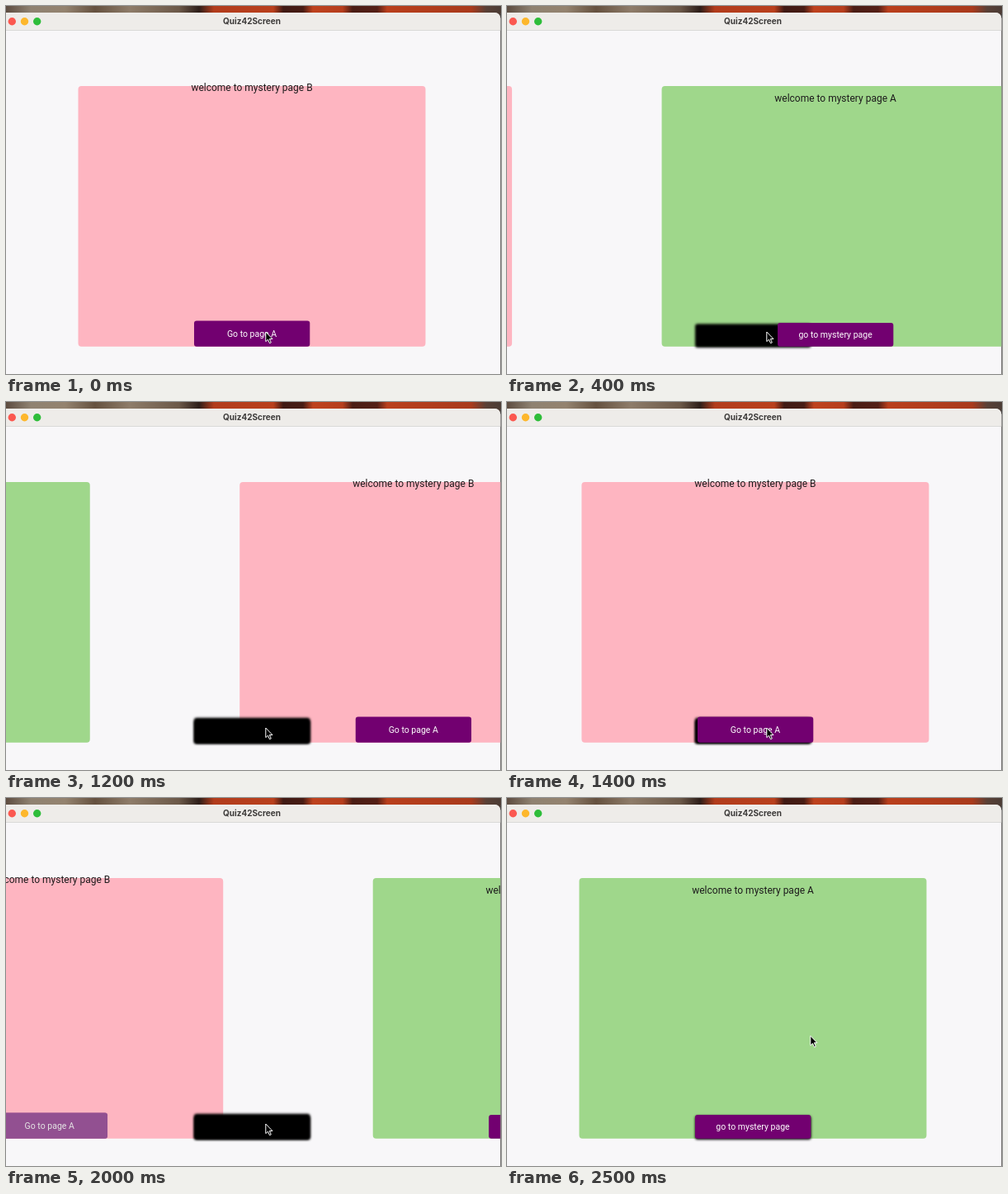
An HTML page with a canvas for the animation above (2600 ms loop, 600x446 px).

```html
<!DOCTYPE html>
<html lang="en">
<head>
<meta charset="utf-8">
<title>Quiz42Screen</title>
<style>
  html, body { margin: 0; height: 100%; overflow: hidden; }
  canvas { display: block; }
</style>
</head>
<body>
<canvas id="stage" width="600" height="446"></canvas>
<script>
const ctx = document.getElementById('stage').getContext('2d');
const LOOP = 2600, STEP = 100, SLIDE = 400, SPAN = 602.5;
const CENTER = 298, BOTTOM = 412.7;

const pages = {
  A: { color: '#9fd78b', title: 'welcome to mystery page A', titleY: 116, label: 'go to mystery page', top: 384 },
  B: { color: '#feb5c1', title: 'welcome to mystery page B', titleY: 103, label: 'Go to page A', top: 381.5 }
};
// Each slide brings in page `to`; it starts when the button is released.
const slides = [
  { start: 163, from: 'B', to: 'A', shadows: 'A' },
  { start: 1028, from: 'A', to: 'B', shadows: 'AB' },
  { start: 1908, from: 'B', to: 'A', shadows: 'AB' }
];

function box(x, y, w, h, r, color) {
  ctx.fillStyle = color;
  ctx.beginPath();
  ctx.roundRect(x, y, w, h, r);
  ctx.fill();
}

function disc(x, y, r, color) {
  ctx.fillStyle = color;
  ctx.beginPath();
  ctx.arc(x, y, r, 0, 2 * Math.PI);
  ctx.fill();
}

function text(str, x, y, font, color) {
  ctx.font = font;
  ctx.fillStyle = color;
  ctx.textAlign = 'center';
  ctx.fillText(str, x, y);
}

function drawDesktop() {
  const g = ctx.createLinearGradient(0, 0, 600, 0);
  const stops = [[0, '#5d4c40'], [.05, '#8f8271'], [.12, '#94836f'], [.18, '#65513f'], [.25, '#8e7c69'],
    [.35, '#6b5848'], [.39, '#2d1e19'], [.42, '#b23c1c'], [.54, '#b9401d'], [.56, '#401a14'], [.6, '#471c14'],
    [.62, '#be421e'], [.68, '#b63e1d'], [.7, '#4a1d15'], [.75, '#541f16'], [.77, '#b93f1c'], [.94, '#a93a1c'],
    [.97, '#594036'], [1, '#4b3c35']];
  for (const [at, color] of stops) g.addColorStop(at, color);
  ctx.fillStyle = g;
  ctx.fillRect(0, 0, 600, 446);
  ctx.fillStyle = '#4b4846';
  ctx.fillRect(599, 9, 1, 437);
}

function drawTitleBar() {
  ctx.fillStyle = '#eeece9';
  ctx.fillRect(0, 8, 600, 21);
  ctx.fillStyle = '#dad9d8';
  ctx.fillRect(0, 29, 600, 1);
  disc(7.3, 18.7, 4.7, '#fb5850');
  disc(22.5, 18.7, 4.7, '#fdb72c');
  disc(37.7, 18.7, 4.7, '#2ebd3a');
  text('Quiz42Screen', CENTER, 22.3, '700 10px Inter, sans-serif', '#3c3a39');
}

function drawCard(page, dx) {
  box(87.5 + dx, 97, 421, BOTTOM - 97, 4, page.color);
  text(page.title, CENTER + dx, page.titleY, '12px Roboto, sans-serif', '#1d1b1c');
}

function drawShadow(page) {
  ctx.filter = 'blur(1.4px)';
  box(228, page.top + 1.2, 140.5, BOTTOM - page.top, 3, '#000');
  ctx.filter = 'none';
}

function drawButton(page, dx, ripple) {
  const y = page.top, h = BOTTOM - y;
  box(228 + dx, y, 140.3, h, 3, '#720070');
  text(page.label, CENTER + dx, y + h / 2 + 4, '10.5px Roboto, sans-serif', '#fff');
  if (ripple <= 0) return;
  ctx.save();
  ctx.beginPath();
  ctx.roundRect(228 + dx, y, 140.3, h, 3);
  ctx.clip();
  disc(313.5 + dx, 396.5, ripple, 'rgba(190,190,190,.42)');
  ctx.restore();
}

function drawCursor(x, y) {
  ctx.beginPath();
  [[0, 0], [0, 11.6], [2.7, 9.2], [4.7, 13.7], [6.5, 12.9], [4.6, 8.5], [8.2, 8.5]]
    .forEach(([px, py]) => ctx.lineTo(x + px, y + py));
  ctx.closePath();
  ctx.fillStyle = '#000';
  ctx.strokeStyle = '#fff';
  ctx.lineWidth = 1;
  ctx.fill();
  ctx.stroke();
}

function drawScreens(t) {
  const active = slides.find(s => t < s.start + SLIDE);
  if (!active) {
    drawCard(pages.A, 0);
    drawShadow(pages.A);
    drawButton(pages.A, 0, 0);
    return;
  }
  const age = t - active.start;
  const from = pages[active.from], to = pages[active.to];
  const ripple = age < 0 ? .18 * (age + 100) : 18 + 1.4 * age;
  if (age < 0) {
    drawCard(from, 0);
    if (active !== slides[0]) drawShadow(from);
    drawButton(from, 0, ripple);
    return;
  }
  const shift = SPAN * (1 - (1 - age / SLIDE) ** 2);
  drawCard(from, -shift);
  drawCard(to, SPAN - shift);
  for (const id of active.shadows) drawShadow(pages[id]);
  drawButton(from, -shift, ripple);
  drawButton(to, SPAN - shift, 0);
}

function draw(t) {
  drawDesktop();
  ctx.save();
  ctx.beginPath();
  ctx.roundRect(-20, 8, 619.3, 460, 7);
  ctx.clip();
  ctx.fillStyle = '#f8f7f9';
  ctx.fillRect(0, 8, 600, 438);
  drawScreens(t);
  drawTitleBar();
  ctx.restore();
  if (t < 2500) drawCursor(314.8, 395);
  else drawCursor(367.8, 288.2);
}

const begin = performance.now();
function tick() {
  const t = (performance.now() - begin) % LOOP;
  draw(Math.floor(t / STEP) * STEP);
  requestAnimationFrame(tick);
}
tick();
</script>
</body>
</html>
```
